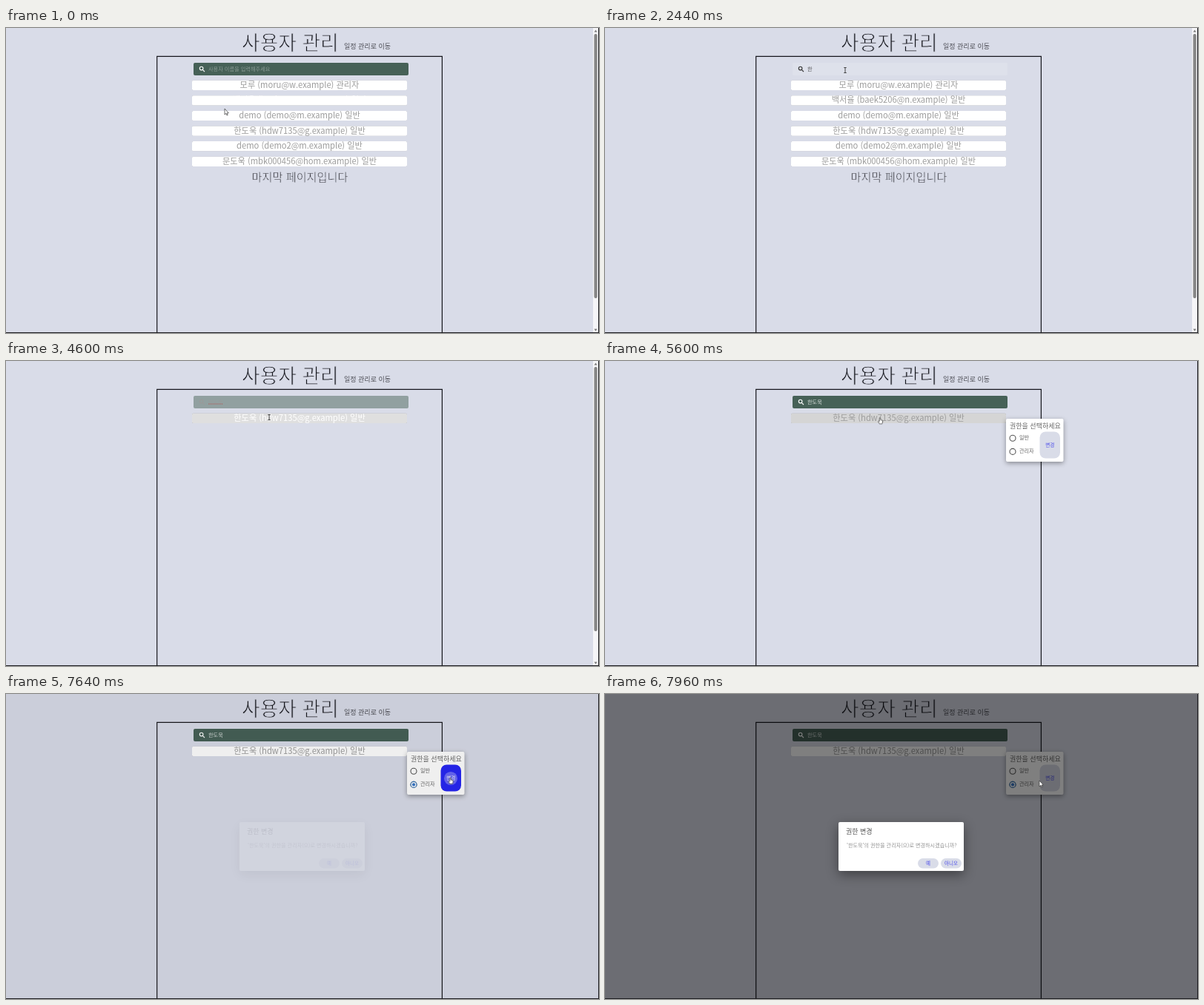
An HTML page for the animation above (8 s loop, 800 by 412 pixels).

```html
<!DOCTYPE html>
<html lang="ko">
<head>
<meta charset="utf-8">
<title>사용자 관리</title>
<style>
  html, body { margin: 0; width: 100%; height: 100%; overflow: hidden; background: #d9dce8; }
  svg { display: block; width: 100%; height: 100%; }
  text { font-family: "Noto Sans CJK KR", "Noto Sans CJK", "Noto Sans CJK JP", sans-serif; font-weight: 300; }
  /* A page-coloured outline slims the strokes of large text. */
  .thin text { stroke: #d9dce8; stroke-width: .034em; }
  .row { filter: drop-shadow(0 .8px .7px rgba(0, 0, 0, .3)); }
  .paper { filter: drop-shadow(0 2px 3px rgba(0, 0, 0, .38)); }
  .modal { filter: drop-shadow(0 5px 8px rgba(0, 0, 0, .42)); }
  #popover { transform-origin: 541px 78px; }
  #search { color: #fff; }
</style>
</head>
<body>
<svg id="stage" viewBox="0 0 800 412"></svg>
<script>
const LOOP = 8000;
const EASE = 'cubic-bezier(.4,0,.2,1)';
const GREEN = '#466157', LIGHT = '#dee1eb', HOVER = '#d5d5d5';
const INK = '#16171e', SOFT = '#9c9c9c', BLUE = '#4a4aea', VIVID = '#2626f4', PALE = '#d9dce8';

const users = [
  '모루 (moru@w.example) 관리자',
  '백서율 (baek5206@n.example) 일반',
  'demo (demo@m.example) 일반',
  '한도욱 (hdw7135@g.example) 일반',
  'demo (demo2@m.example) 일반',
  '문도욱 (mbk000456@hom.example) 일반'
];
const typed = [
  [1920, 'ㅎ'], [2120, '하'], [2440, '한'], [2760, '한ㄷ'],
  [2920, '한도'], [3200, '한동'], [3280, '한도우'], [3360, '한도욱']
];

// Text placed by the vertical centre of its glyphs.
const label = (x, mid, size, str, fill = INK, anchor = 'start', id = '') =>
  `<text id="${id}" x="${x}" y="${mid + size * .38}" font-size="${size}" fill="${fill}" text-anchor="${anchor}">${str}</text>`;

const row = (name, i, str) => {
  const mid = 77 + i * 20.6;
  return `<rect id="${name}Bg" class="row" x="251" y="${mid - 6.3}" width="290" height="13.2" rx="1.6" fill="#fff"/>`
    + label(396, mid - .4, 11.2, str, SOFT, 'middle', name + 'Text');
};

const radio = (y, str) =>
  `<circle cx="550" cy="${y}" r="4" fill="none" stroke="#555" stroke-width="1.1"/>` + label(559, y - .8, 7.1, str, '#666');

const pill = (x, str) =>
  `<rect x="${x}" y="222" width="28" height="13.5" rx="6.75" fill="${PALE}"/>` + label(x + 14, 228.3, 6.5, str, BLUE, 'middle');

document.getElementById('stage').innerHTML = `
  <rect width="800" height="412" fill="${PALE}"/>
  <g class="thin">${label(318, 20, 26.8, '사용자 관리')}</g>
  ${label(456, 25, 9, '일정 관리로 이동', '#4c4d55')}
  <path d="M203.7 412V38.3H588.4V412" fill="none" stroke="#15161c" stroke-width="1.2"/>

  <g id="search">
    <rect id="bar" x="253" y="47" width="290" height="17" rx="2" fill="${GREEN}"/>
    <g fill="none" stroke="currentColor" stroke-width="1.1">
      <circle cx="263.6" cy="54.6" r="2.3"/><path d="M265.3 56.3L268 59"/>
    </g>
    <g id="hint" opacity=".36">${label(273, 55, 7.2, '사용자 이름을 입력해주세요', 'currentColor')}</g>
    <g opacity=".8">${typed.map(([, str], i) => label(273, 55, 7.2, str, 'currentColor', 'start', 'typed' + i)).join('')}</g>
    <path id="spell" d="M273 58H293" stroke="#b4504c" stroke-width=".8" stroke-dasharray="1.2 .8"/>
    <rect id="caret" x="273" y="51" width="1" height="9" fill="#222"/>
  </g>

  <g id="list">
    ${users.map((str, i) => row('user' + i, i, str)).join('')}
    <g class="thin">${label(396.5, 201, 15.2, '마지막 페이지입니다', '#2c2d34', 'middle')}</g>
  </g>
  <g id="match">${row('found', 0, users[3])}</g>

  <g id="scrollbar">
    <rect x="792" width="7" height="411" fill="#f5f5f8"/>
    <rect x="793.4" y="8" width="4.2" height="357" rx="2" fill="#858585"/>
    <path d="M793.5 5.5h4l-2-3zM793.5 406.5h4l-2 3z" fill="#777"/>
  </g>

  <g id="popover">
    <rect class="paper" x="541" y="78" width="77.5" height="58" rx="2" fill="#fff"/>
    ${label(546, 87.3, 9, '권한을 선택하세요', '#666')}
    ${radio(104.3, '일반')}
    ${radio(122.4, '관리자')}
    <g id="chosen">
      <circle cx="550" cy="122.4" r="4" fill="#fff" stroke="#3a78b8" stroke-width="1.1"/>
      <circle cx="550" cy="122.4" r="2.1" fill="#3a78c8"/>
    </g>
    <clipPath id="buttonClip"><rect x="586.5" y="95.5" width="27.5" height="36" rx="8"/></clipPath>
    <g clip-path="url(#buttonClip)">
      <rect id="button" x="586" y="95" width="29" height="37" fill="${PALE}"/>
      <circle id="ripple" cx="600" cy="114" r="0" fill="#fff"/>
    </g>
    ${label(600.2, 113, 6.6, '변경', BLUE, 'middle', 'buttonText')}
  </g>

  <rect id="backdrop" width="800" height="412" opacity="0"/>
  <g id="dialog">
    <rect class="modal" x="315" y="173" width="169" height="66" rx="2" fill="#fff"/>
    ${label(325, 185.3, 9, '권한 변경', '#555')}
    ${label(326, 204.3, 7.1, "'한도욱'의 권한을 관리자(으)로 변경하시겠습니까?", '#929292')}
    ${pill(422, '예')}
    ${pill(453, '아니오')}
  </g>
  <path d="M0 411.5H800M799.5 0V412" stroke="#1c1c20"/>

  <g id="cursor">
    <path id="arrow" d="M0 0V8L1.8 6.3L3 9L4.2 8.5L3 5.9H5.4Z" fill="#fff" stroke="#333" stroke-width=".7"/>
    <path id="beam" d="M-1.7 -3.5H1.7M0 -3.5V3.5M-1.7 3.5H1.7" fill="none" stroke="#333" stroke-width=".9"/>
    <path id="hand" d="M-.8 .5Q0 -.5 .8 .5V3L3.6 3.8V6L2.8 8.3H-.7L-2.6 5.2L-1.7 4.5L-.8 5.2Z" fill="#fff" stroke="#333" stroke-width=".7"/>
  </g>`;

// steps: [time in ms, value]
function play(id, prop, steps, easing = EASE) {
  const all = [...steps];
  if (all[0][0] > 0) all.unshift([0, all[0][1]]);
  if (all[all.length - 1][0] < LOOP) all.push([LOOP, all[all.length - 1][1]]);
  document.getElementById(id).animate(
    all.map(([time, value]) => ({ offset: time / LOOP, [prop]: value, easing })),
    { duration: LOOP, iterations: Infinity }
  );
}
const flip = (id, prop, steps) => play(id, prop, steps, 'step-end');

// Visible only inside the given [from, to] spans.
const show = (id, ...spans) => flip(id, 'visibility', [
  ...(spans[0][0] > 0 ? [[0, 'hidden']] : []),
  ...spans.flatMap(([from, to]) => to < LOOP ? [[from, 'visible'], [to, 'hidden']] : [[from, 'visible']])
]);

// Pointer
play('cursor', 'transform', [
  [0, 295, 109], [40, 295, 109], [520, 332, 55], [880, 332, 55], [1200, 324, 57],
  [4360, 324, 57], [4600, 355, 76], [4880, 371, 76.5], [5640, 371, 76.5],
  [6000, 529, 126], [6400, 549, 126], [6880, 549, 126],
  [7240, 599.5, 113], [7680, 599.5, 113], [7940, 586, 117]
].map(([t, x, y]) => [t, `translate(${x}px, ${y}px)`]), 'linear');
show('arrow', [0, 440], [5680, 6320], [7760, LOOP]);
show('beam', [440, 4640]);
show('hand', [4640, 5680], [6320, 7760]);

// Search field
play('bar', 'fill', [[440, GREEN], [840, LIGHT], [4460, LIGHT], [4860, GREEN]]);
play('search', 'color', [[440, '#fff'], [840, '#333'], [4460, '#333'], [4860, '#fff']]);
show('hint', [0, 1920]);
show('caret', [900, 1400]);
show('spell', [3880, 5200]);
typed.forEach(([from], i) => show('typed' + i, [from, i + 1 < typed.length ? typed[i + 1][0] : LOOP]));

// Rows
show('list', [0, 3960]);
show('match', [3960, LOOP]);
play('user1Bg', 'fill', [[0, '#fff'], [40, '#fff'], [200, HOVER], [450, '#fff']]);
flip('user1Text', 'fill', [[0, '#fff'], [200, SOFT]]);
play('user0Bg', 'fill', [[270, '#fff'], [400, HOVER], [650, '#fff']]);
flip('user0Text', 'fill', [[0, SOFT], [270, '#fff'], [400, SOFT]]);
play('foundBg', 'fill', [[4480, '#fff'], [4730, HOVER], [5600, HOVER], [5850, '#fff']]);
flip('foundText', 'fill', [[0, SOFT], [4480, '#fff'], [5560, SOFT]]);

// Role popover
show('scrollbar', [0, 5320]);
play('popover', 'opacity', [[5300, 0], [5540, 1]]);
play('popover', 'transform', [[5300, 'scale(.75, .56)'], [5560, 'scale(1, 1)']]);
show('chosen', [6520, LOOP]);
play('button', 'fill', [[7160, PALE], [7410, VIVID], [7640, VIVID], [7890, PALE]]);
play('buttonText', 'fill', [[7160, BLUE], [7410, '#fff'], [7640, '#fff'], [7890, BLUE]]);
play('ripple', 'r', [[7500, '2px'], [7900, '22px']], 'linear');
play('ripple', 'opacity', [[0, 0], [7499, 0], [7500, .35], [7680, .3], [7880, 0]], 'linear');

// Confirmation
play('backdrop', 'opacity', [[7597, 0], [7822, .5]]);
play('dialog', 'opacity', [[7597, 0], [7822, 1]]);
</script>
</body>
</html>
```
